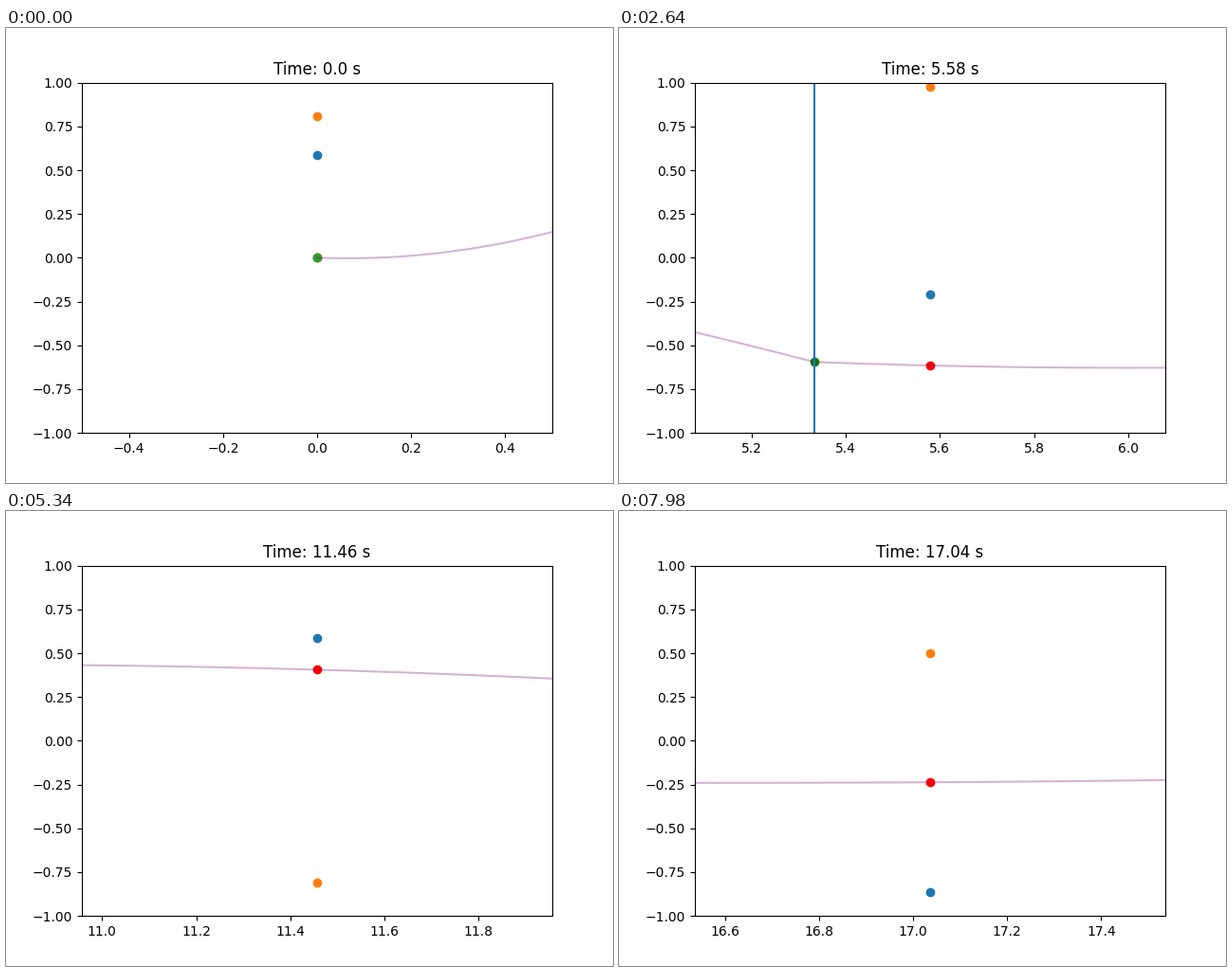
Write a matplotlib script that moves like this. It is 640 px wide and 480 px high and loops after 8000 ms.

```python
import numpy as np
import matplotlib.pyplot as plt
from matplotlib.animation import FuncAnimation

TICK = 20                # ms per animation frame
FRAMES = 400
DT = 80 / 803            # simulated seconds per step
TURN = 13 / 3            # time between kicks
PHASE0, ADVANCE = 36, 156   # degrees
KICK_SLOPE = 0.1

kick_t = np.array([0] + [1 + TURN * k for k in range(5)])
kick_y = [0, 0.692, -0.595, 0.385, -0.109, -0.1846]


def orbit():
    """Parabolic arcs between kicks, leaving each with slope -/+ KICK_SLOPE."""
    ts, ys = [], []
    for k in range(len(kick_t) - 1):
        span = kick_t[k + 1] - kick_t[k]
        slope = KICK_SLOPE * (-1) ** (k + 1)
        bend = (kick_y[k + 1] - kick_y[k] - slope * span) / span ** 2
        tau = np.linspace(0, span, 80)
        ts.append(kick_t[k] + tau)
        ys.append(kick_y[k] + slope * tau + bend * tau ** 2)
    return np.concatenate(ts), np.concatenate(ys)


def step_at(tick):
    """Steps last 1, 1 and 5 ticks in turn; the loop enters at the second."""
    group, rest = divmod(tick + 1, 7)
    return 3 * group + min(rest, 2) - 1


path_t, path_y = orbit()

fig, ax = plt.subplots(figsize=(6.4, 4.8), dpi=100)
ax.set_ylim(-1, 1)
title = ax.set_title("")

sin_dot, = ax.plot([], [], "o", color="C0")
cos_dot, = ax.plot([], [], "o", color="C1")
particle, = ax.plot([], [], "o", color="red")
ax.plot(kick_t[:1], kick_y[:1], "o", color="C2")
ax.plot(kick_t[1:], kick_y[1:], "o", color="green")
ax.plot(path_t, path_y, color="purple", alpha=0.3)
for t in kick_t[1:]:
    ax.axvline(t, color="C0")


def update(tick):
    t = step_at(tick) * DT
    kicks = np.searchsorted(kick_t, t, side="right") - 1
    angle = np.radians(PHASE0 + ADVANCE * kicks)
    sin_dot.set_data([t], [np.sin(angle)])
    cos_dot.set_data([t], [np.cos(angle)])
    particle.set_data([t], [np.interp(t, path_t, path_y)])
    ax.set_xlim(t - 0.5, t + 0.5)
    title.set_text(f"Time: {round(float(t), 2)} s")
    return sin_dot, cos_dot, particle, title


anim = FuncAnimation(fig, update, frames=FRAMES, interval=TICK,
                     repeat=True, repeat_delay=0, blit=False)
plt.show()
```
